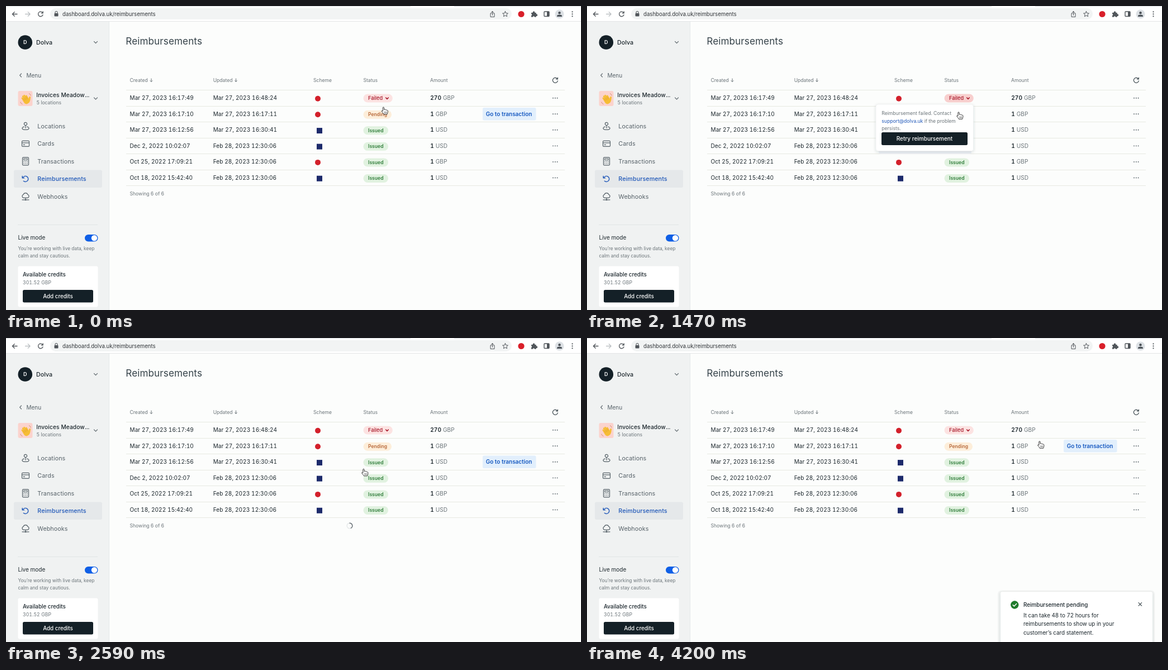
An HTML page that plays this animation: 1029 px wide and 544 px high, repeating every 4270 ms.

```html
<!DOCTYPE html>
<html lang="en">
<head>
<meta charset="utf-8">
<title>Reimbursements</title>
<style>
  html, body { margin: 0; width: 100%; height: 100%; overflow: hidden; background: #fcfdfc; }
  svg { display: block; width: 100%; height: 100%; }
  text { font-family: Inter, "Liberation Sans", sans-serif; font-variant-numeric: tabular-nums; white-space: pre; }
  .wide { letter-spacing: .1px; }
</style>
</head>
<body>
<svg id="stage" viewBox="0 0 1029 544" preserveAspectRatio="none"></svg>
<script>
const LOOP = 4270, STEP = 70;
const INK = '#1b262c', GREY = '#6b7479', SLATE = '#566168', BLUE = '#1f57b8', DARK = '#142027';

const rect = (x, y, w, h, fill, r = 0, more = '') =>
  `<rect x="${x}" y="${y}" width="${w}" height="${h}" rx="${r}" fill="${fill}" ${more}/>`;
const circle = (x, y, r, fill, more = '') =>
  `<circle cx="${x}" cy="${y}" r="${r}" fill="${fill}" ${more}/>`;
const line = (d, color, width = 1.2) =>
  `<path d="${d}" fill="none" stroke="${color}" stroke-width="${width}" stroke-linecap="round" stroke-linejoin="round"/>`;
const text = (x, y, s, size, fill = INK, weight = 400, more = '') =>
  `<text x="${x}" y="${y}" font-size="${size}" fill="${fill}" font-weight="${weight}" ${more}>${s}</text>`;
const group = (id, body) => `<g id="${id}">${body}</g>`;
const outline = (color, width = 1.2) => `stroke="${color}" stroke-width="${width}"`;
const chevron = (x, y, color, size = 3, width = 1.2) =>
  line(`M${x - size} ${y - size / 2}l${size} ${size}l${size} ${-size}`, color, width);

function browserBar() {
  const c = '#50555a';
  return rect(0, 0, 1029, 28, '#fff') +
    rect(0, 0, 724, 1, '#dcdfe3') + rect(802, 0, 227, 1, '#dcdfe3') +
    rect(79, 4, 826, 20, '#f2f4f4', 10) + rect(0, 27, 1029, 1, '#e3e5e6') +
    line('M20 14.5H11.5M15.2 10.7l-3.8 3.8l3.8 3.8', c, 1.3) +
    line('M34.5 14.5H43M39.3 10.7l3.8 3.8l-3.8 3.8', '#bdc1c4', 1.3) +
    line('M65.6 12.2A4.3 4.3 0 1 0 66 15.8M66.2 9.8v3h-3', c, 1.3) +
    rect(86.5, 13, 7, 5.5, c, 1) + line('M88 13v-1.5a2 2 0 0 1 4 0V13', c, 1.1) +
    text(101, 18, 'dashboard.dolva.uk/reimbursements', 9.65, '#303438') +
    line('M869 13h-2v6.5h7V13h-2M870.5 16.5V9.7M868.5 11.5l2-2l2 2', c, 1) +
    line('M893.5 9.6l1.4 3.2l3.5.3l-2.6 2.3l.8 3.4l-3.1-1.8l-3.1 1.8l.8-3.4l-2.6-2.3l3.5-.3z', c, 1) +
    circle(922, 14.5, 5.6, '#d91f2a') +
    `<path d="M940 12h2.7a1.9 1.9 0 1 1 3.6 0h2.4v2.4a1.9 1.9 0 1 1 0 3.6v1.8h-2.8a1.6 1.6 0 0 0-3.2 0H940v-2.7a1.7 1.7 0 0 0 0-3.2z" fill="${c}"/>` +
    rect(963, 10, 9, 8.5, 'none', 1, outline(c, 1.4)) + rect(968, 10, 4, 8.5, c) +
    circle(990.5, 14.5, 8, '#dde1e5') + circle(990.5, 12.3, 2.2, '#4c5258') +
    `<path d="M986 19v-1.2c0-3.2 9-3.2 9 0V19z" fill="#4c5258"/>` +
    [10.4, 14.4, 18.4].map(y => circle(1013.5, y, 1.1, c)).join('');
}

const menuIcons = [
  circle(0, -4, 2.6, 'none', outline(SLATE)) +
    line('M0-1.4V3.4M-2.6 1.2c-5.4 1-4.400 5.200 2.600 5.200s8-4.200 2.600-5.200', SLATE),
  rect(-6.5, -5, 13, 10, 'none', 1.5, outline(SLATE)) + line('M-6.5-1.6h13M-4 2h2.5', SLATE),
  rect(-5.5, -7, 11, 14, 'none', 1.5, outline(SLATE)) +
    rect(-3.2, -4.8, 6.4, 2.8, 'none', 0, outline(SLATE, 1)) +
    [-3, 0, 3].map(x => circle(x, .8, .8, SLATE) + circle(x, 3.9, .8, SLATE)).join(''),
  line('M-4.8-2A5 5 0 1 1-3.6 3.8M-5.8-5v3.5h3.5', BLUE, 1.4),
  line('M-3.5 2.5a3 3 0 0 1-.5-5.8a4.2 4.2 0 0 1 8 0a3 3 0 0 1-.5 5.8zM0 2.5V5M-6 6h12', SLATE) +
    circle(0, 6, 1.4, SLATE)
];

function hand() {
  const skin = '#f6bd35';
  const finger = (x, y, l) => line(`M${x} 2V${y - l}`, skin, 2.8);
  return `<g transform="translate(35 167) rotate(-32)">` +
    finger(-4, -1, 4) + finger(-1.2, -2, 5) + finger(1.6, -2, 5) + finger(4.3, -1, 3.5) +
    rect(-5.4, -1, 11.2, 9.5, skin, 4.5) + line('M5 5l3.4-4', skin, 2.8) +
    line('M-2.6-3V1M.2-3V1M3-3V1', '#d9952a', .6) + '</g>' +
    line('M26 172c.5 2 1.5 3 3.2 3.5M44 160c-.4-1.7-1.2-2.7-2.6-3.3', '#d78d78', 1);
}

function sidebar() {
  const names = ['Locations', 'Cards', 'Transactions', 'Reimbursements', 'Webhooks'];
  const items = names.map((name, i) => {
    const y = 215 + i * 31.45, on = i === 3;
    return (on ? rect(14, y - 15.8, 158, 31.5, '#e5e8ea', 3) : '') +
      `<g transform="translate(35 ${y})">${menuIcons[i]}</g>` +
      text(56.3, y + 3.8, name, 10.7, on ? BLUE : SLATE, on ? 500 : 400, 'class="wide"');
  }).join('');
  return rect(0, 28, 185, 516, '#f0f2f2') + rect(184, 28, 1, 516, '#e6e9e9') +
    circle(34.3, 65, 12.8, DARK) + text(34.3, 68.4, 'D', 9, '#fff', 600, 'text-anchor="middle"') +
    text(54, 68.8, 'Dolva', 10.7, INK, 500) + chevron(160.5, 65, GREY) +
    line('M27.5 121l-2.8 3l2.8 3', GREY) + text(36.5, 127.6, 'Menu', 10, SLATE) +
    rect(21.5, 152, 26, 27, '#fbd3cd', 3) + hand() +
    text(54.3, 162.8, 'Invoices Meadow...', 10.2, INK, 500, 'class="wide"') +
    text(54.5, 175.8, '5 locations', 8.6, GREY) + chevron(160.5, 165.5, GREY) + items +
    rect(21, 391, 143, 1, '#e1e5e5') +
    text(21.5, 417.8, 'Live mode', 10, INK) +
    rect(141, 409, 23.5, 12.5, '#0f5fe6', 6.25) + circle(158, 415.2, 5.2, '#fff') +
    text(21.5, 436.8, 'You’re working with live data, keep', 8.4, GREY) +
    text(21.5, 450.2, 'calm and stay cautious.', 8.4, GREY) +
    rect(21.5, 465.5, 143, 73, '#fff', 3) +
    text(30, 483.5, 'Available credits', 9.8, INK, 500) +
    text(30, 498.4, '301.52 GBP', 8.6, GREY, 400, 'class="wide"') +
    rect(30, 508, 126, 22.5, DARK, 2.5) +
    text(93, 522.6, 'Add credits', 9.8, '#fff', 500, 'text-anchor="middle"');
}

const rows = [
  ['Mar 27, 2023 16:17:49', 'Mar 27, 2023 16:48:24', 'red', 'Failed', '270', 'GBP'],
  ['Mar 27, 2023 16:17:10', 'Mar 27, 2023 16:17:11', 'red', 'Pending', '1', 'GBP'],
  ['Mar 27, 2023 16:12:56', 'Mar 27, 2023 16:30:41', 'blue', 'Issued', '1', 'USD'],
  ['Dec 2, 2022 10:02:07', 'Feb 28, 2023 12:30:06', 'blue', 'Issued', '1', 'USD'],
  ['Oct 25, 2022 17:09:21', 'Feb 28, 2023 12:30:06', 'red', 'Issued', '1', 'GBP'],
  ['Oct 18, 2022 15:42:40', 'Feb 28, 2023 12:30:06', 'blue', 'Issued', '1', 'USD']
];
const TOP = 150.5, PITCH = 28.55;
const rowY = i => TOP + PITCH * (i + .5);

function statusPill(status, y) {
  if (status === 'Failed')
    return group('failPill', rect(639.5, y - 7.3, 52.3, 15, 'currentColor', 7.5)) +
      group('failInk', text(648, y + 3.5, status, 9.2, 'currentColor', 500) + chevron(682, y + .4, 'currentColor', 2.3, 1.6));
  const [w, bg, ink] = status === 'Pending' ? [50.5, '#fdeeda', '#b8693a'] : [44.5, '#e1f2e0', '#2f7d3a'];
  return rect(639.5, y - 6.6, w, 15, bg, 7.5) + text(648, y + 3.9, status, 8.6, ink, 600);
}

function tableRow([created, updated, scheme, status, amount, currency], i) {
  const y = rowY(i), base = y + 3.4;
  const mark = scheme === 'red' ? circle(558, y + .9, 5, '#d3202b') : rect(556, y - 3.8, 10, 10, '#1c2a6b');
  return text(221.5, base, created, 10, INK, 400, 'class="wide"') +
    text(370.7, base, updated, 10, INK, 400, 'class="wide"') +
    mark + statusPill(status, y) +
    text(759.2, base, `${amount} <tspan fill="${GREY}" font-weight="400">${currency}</tspan>`, 10.1, INK, 600, 'class="wide"') +
    [979, 982.8, 986.6].map(x => circle(x, y - .1, .95, SLATE)).join('') +
    rect(215, Math.round(TOP + PITCH * (i + 1) - .5), 785, 1, '#e7e9e2');
}

function table() {
  const heads = { 221.5: 'Created', 370.7: 'Updated', 550: 'Scheme', 639.5: 'Status', 759: 'Amount' };
  const arrow = x => line(`M${x} 130v5.5M${x - 2} 133.6l2 2l2-2`, GREY, 1);
  return text(214.3, 69, 'Reimbursements', 17.1, '#36434a', 400, 'class="wide"') +
    Object.entries(heads).map(([x, s]) => text(x, 136, s, 8.6, GREY)).join('') +
    arrow(260) + arrow(411.5) +
    line('M986.5 130.3a4.5 4.5 0 1 0 .8 3.5M987.3 128v3h-3', '#3d494f', 1.2) +
    rect(215, 150, 785, 1, '#e7e9e2') + rows.map(tableRow).join('') +
    text(221.5, 339, 'Showing 6 of 6', 8.6, GREY);
}

const goButton = rect(853, -11.3, 95.5, 22.5, '#e2effc', 2.5) +
  text(858.7, 3.4, 'Go to transaction', 9.95, '#1558c0', 600);

const popover = rect(522, 250, 166, 15, '#eef0f5', 4) +
  rect(517, 176, 174.5, 83.5, '#fff', 4, 'filter="url(#soft)" ' + outline('#e9ebec', .6)) +
  text(527.3, 195.2, 'Reimbursement failed. Contact', 8.6, GREY) +
  text(527.3, 208.8, `<tspan fill="${BLUE}">support@dolva.uk</tspan> if the problem`, 8.6, GREY) +
  text(527.3, 222.2, 'persists.', 8.6, GREY) +
  group('retry', rect(527, 226, 154, 23, 'currentColor', 2.5)) +
  text(604, 241.2, 'Retry reimbursement', 10, 'currentColor', 500, 'id="retryText" text-anchor="middle"');

const toast = rect(735, 452, 281, 100, '#f3f5f4', 6) +
  rect(740, 454, 272, 110, '#fff', 4, 'filter="url(#soft)"') +
  circle(765.3, 477.5, 7.2, '#1f7a2c') + line('M762.2 477.7l2.2 2.2l4.2-4.4', '#fff', 1.5) +
  text(781, 480.5, 'Reimbursement pending', 9.9, INK, 500) +
  ['It can take 48 to 72 hours for', 'reimbursements to show up in your', 'customer’s card statement.']
    .map((s, i) => text(781, 499.7 + i * 15.7, s, 9.8, INK)).join('') +
  line('M987 473.6l5.6 5.6M992.6 473.6l-5.6 5.6', '#3d494f', 1.2);

// Pointing hand whose fingertip sits at the local origin.
const pointer = `<path d="M-1.2.8C-1.2-.6 1-.6 1 .8V4.2C2 3.2 3.4 3.7 3.6 4.6C4.6 4.1 5.6 4.3 5.8 5.2C6.9 4.9 7.8 5.4 7.8 6.5V8.5C7.8 10 6.8 10.8 6.6 12.3H.3C-.2 10.5-2.2 9-3.3 7.2C-3.8 6.2-2.6 5.4-1.2 7z" fill="#fff" ${outline('#222', .9)} stroke-linejoin="round"/>` +
  line('M1.8 7.8v2.6M3.6 7.8v2.6M5.4 7.8v2.6', '#222', .6);

const stage = document.getElementById('stage');
stage.innerHTML =
  `<defs><filter id="soft" x="-10%" y="-15%" width="120%" height="135%"><feDropShadow dx="0" dy="1.5" stdDeviation="2.5" flood-color="#24343c" flood-opacity=".17"/></filter></defs>` +
  rect(0, 0, 1029, 544, '#fcfdfc') + sidebar() + table() + browserBar() +
  group('go', goButton) +
  group('spinner', circle(0, 0, 4.8, 'none', outline('#e4e7e8', 1.4)) +
    line('M0-4.8A4.8 4.8 0 0 1 2.4 4.15', GREY, 1.5)) +
  group('popover', popover) + group('toast', toast) + group('pointer', pointer);

const part = id => document.getElementById(id);
const show = (id, on) => part(id).setAttribute('display', on ? 'inline' : 'none');
const tint = (id, color) => part(id).style.color = color;
const place = (id, x, y, more = '') => part(id).setAttribute('transform', `translate(${x} ${y}) ${more}`);
const span = (t, a, b) => Math.min(1, Math.max(0, (t - a) / (b - a)));
const smooth = p => p * p * (3 - 2 * p);
const within = (t, a, b) => t >= a && t < b;

// [start, end, x, y]: each move begins where the previous one ended.
const moves = [[70, 420, 678.7, 166], [1330, 1680, 640, 234.5], [2660, 3150, 810, 185]];
function pointerAt(t) {
  let x = 675.5, y = 181.3;
  for (const [a, b, toX, toY] of moves) {
    const p = smooth(span(t, a, b));
    x += (toX - x) * p;
    y += (toY - y) * p;
  }
  return [x, y];
}

function draw(t) {
  const [x, y] = pointerAt(t);
  const open = within(t, 1260, 2380), sending = t >= 1750;
  const overPill = x > 640 && x < 692 && y > 157 && y < 173;
  place('pointer', x, y);

  place('go', 0, rowY(Math.floor((y - TOP) / PITCH)));
  show('go', !open || y < 176);

  tint('failPill', overPill ? '#d3041f' : open ? '#f8cfce' : '#fce3e2');
  tint('failInk', overPill ? '#fff' : '#a9182a');

  show('popover', open);
  tint('retry', sending ? '#c6cacd' : DARK);
  tint('retryText', sending ? '#8c9398' : '#fff');

  show('spinner', within(t, 2380, 2870));
  place('spinner', 615, 336, `rotate(${(t - 2590) * .48})`);

  const p = span(t, 3220, 3870), slide = 1 - (1 - p) ** 2;
  show('toast', p > 0);
  place('toast', 306 * (1 - slide), 0);
  part('toast').setAttribute('opacity', Math.min(1, slide * slide * 4));
}

const start = performance.now();
function tick() {
  const t = (performance.now() - start) % LOOP;
  draw(Math.floor(t / STEP) * STEP);
  requestAnimationFrame(tick);
}
tick();
</script>
</body>
</html>
```
